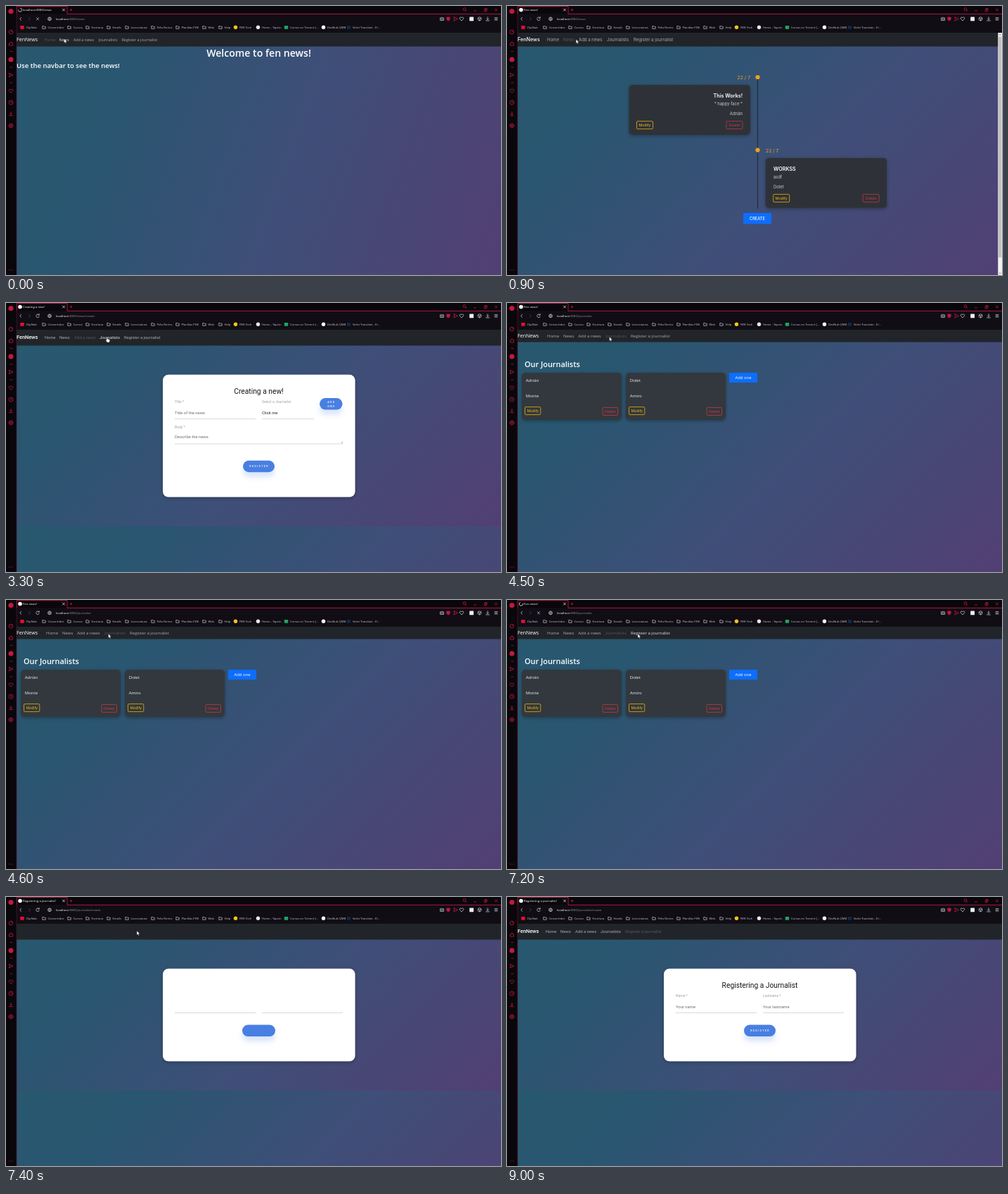
These frames come from a looping animation (704x382 px, 9.5 s). An HTML page:

```html
<!DOCTYPE html>
<html lang="en">
<head>
<meta charset="utf-8">
<title>News site walkthrough</title>
<style>
  html, body { margin: 0; width: 100%; height: 100%; overflow: hidden; background: #09080c; }
  #backdrop { position: absolute; left: 15px; top: 38px; width: 689px; height: 344px; }
  svg { position: absolute; left: 0; top: 0; }
</style>
</head>
<body>
<div id="backdrop"></div>
<svg id="stage" width="704" height="382" viewBox="0 0 704 382"></svg>
<script>
const LOOP = 9500, STEP = 100;
const SEGOE = "'Open Sans', 'Noto Sans', sans-serif";
const INTER = "Inter, sans-serif";
const ROBOTO = "Roboto, sans-serif";
const RED = '#c4183f', AMBER = '#f0a01c', YELLOW = '#ffc107', DANGER = '#dc3545', BLUE = '#0d6efd';

// Drawing helpers: each returns SVG markup.
const text = (x, y, size, str, fill = '#fff', font = SEGOE, extra = '') =>
  `<text x="${x}" y="${y}" font-size="${size}" font-family="${font}" fill="${fill}" ${extra}>${str}</text>`;
const rect = (x, y, w, h, fill, r = 0, extra = '') =>
  `<rect x="${x}" y="${y}" width="${w}" height="${h}" rx="${r}" fill="${fill}" ${extra}/>`;
const circle = (x, y, r, fill, extra = '') => `<circle cx="${x}" cy="${y}" r="${r}" fill="${fill}" ${extra}/>`;
const ring = (x, y, r, color) => circle(x, y, r, 'none', `stroke="${color}" stroke-width=".8"`);
const line = (d, color, width = .8, fill = 'none') =>
  `<path d="${d}" stroke="${color}" stroke-width="${width}" fill="${fill}"/>`;
const icon = (x, y, d, color, fill) => `<g transform="translate(${x} ${y})">${line(d, color, .8, fill)}</g>`;
const MIDDLE = 'text-anchor="middle"', END = 'text-anchor="end"', SEMI = 'font-weight="600"', MEDIUM = 'font-weight="500"';

const HEART = 'M0 2.7L-2.6 0C-3.6-2-1-3.4 0-1.3C1-3.4 3.6-2 2.6 0Z';
const PLANE = 'M-2.8-2.7L3 0L-2.8 2.7L-1.6 0Z';
const DOWNLOAD = 'M0-3V1M-1.7-.6L0 1.2L1.7-.6M-2.8 2.6H2.8';
const CROSS = 'M-1.8-1.8L1.8 1.8M1.8-1.8L-1.8 1.8';
const FOLDER = 'M-2.2-1.8H-.3L.4-1H2.2V1.9H-2.2Z';

const bookmarks = [
  [23, 'ClipNub', '#e3122c'], [54, 'Convertidor'], [90, 'Cursos'], [116, 'Escritura'], [146, 'Emails'],
  [172, 'Licenciatura'], [209, 'Pelis/Series'], [244, 'Planillas FEN'], [282, 'Web'], [305, 'Help'],
  [326.5, 'FEN Tech', '#f5c518', true], [358.5, 'Home - Tapvin', '#e8e8ea', true],
  [398.5, 'Cursos en Torrent [...', '#1fa463'], [451.5, 'DevNub QMB', '#fff', true],
  [487.5, 'Verbi Translate - El...', '#10294a']
];

function bookmarkBar() {
  return bookmarks.map(([x, label, color, round]) => {
    const mark = !color ? icon(x, 30.3, FOLDER, '#b9b9bd')
      : round ? circle(x, 30.3, 2.7, color) : rect(x - 2.7, 27.9, 5.4, 4.8, color, .6);
    return mark + text(x + 5.4, 31.9, 4.15, label, '#c9c9cd');
  }).join('');
}

function sidebar() {
  const dash = y => line(`M5.7 ${y}H9.3`, RED, .7);
  return rect(0, 0, 15, 382, '#09070c') + line('M15 0V382', '#641329', .7) +
    circle(7, 7.5, 3.6, RED) +
    ring(7, 37, 2.8, RED) + line('M7 37L9 35', RED) +
    icon(7, 53.5, 'M-2.5 2.6V-.6H-1L.2-2.8L1 -1H2.6V2.6Z', RED) + dash(64.5) +
    circle(7, 76, 3.5, RED) + dash(87) + icon(7, 98, PLANE, RED) + dash(109) +
    icon(7, 120.5, HEART, RED) + ring(7, 137, 3, RED) + line('M7 135.2V137.2H8.5', RED) +
    icon(7, 153, DOWNLOAD, RED) + ring(7, 170, 2.4, RED) + ring(7, 170, .8, RED) +
    `<circle cx="7" cy="170" r="3" fill="none" stroke="${RED}" stroke-dasharray="1.2 1.16"/>` +
    [4.8, 7, 9.2].map(x => circle(x, 375, .6, RED)).join('');
}

function browser(title, path, loading, t) {
  const gray = '#c4c4c8';
  const favicon = loading
    ? `<path d="M20 3a2.6 2.6 0 1 1-2.6 2.6" stroke="#ddd" stroke-width=".8" fill="none" transform="rotate(${t * .36} 20 5.6)"/>`
    : circle(20, 5.5, 2.8, '#fff');
  const reload = loading ? icon(45, 18.3, CROSS, gray)
    : line('M47 17A2.3 2.3 0 1 0 47.3 18.8M47.2 15.2V17.2H45.2', gray);
  return rect(15, 0, 689, 11, '#09070c') + rect(15, 11, 689, 27, '#100d15') +
    line('M15.4 11V.5H87V11.3H704', RED, .9) +
    favicon + text(24, 7.3, 4.3, title) + icon(82, 5.5, CROSS, '#ddd') +
    icon(92.5, 5.5, 'M-1.8 0H1.8M0-1.8V1.8', RED) +
    icon(652.5, 5, 'M1 1L2.6 2.6M1.4-.4A1.9 1.9 0 1 1-2.4-.4A1.9 1.9 0 1 1 1.4-.4', RED) +
    icon(667, 6.8, 'M-1.8 0H1.8', RED) +
    icon(682, 5.5, 'M-1.8-.8H1V2H-1.8ZM-.8-.8V-1.9H2V1H1', RED) + icon(697, 5.5, CROSS, RED) +
    icon(21, 18.3, 'M1-2.3L-1.3 0L1 2.3', gray) + icon(33, 18.3, 'M-1-2.3L1.3 0L-1 2.3', '#4a484e') + reload +
    ring(62, 18.3, 2.4, gray) + line('M59.6 18.3H64.4M62 15.9Q59.8 18.3 62 20.7Q64.2 18.3 62 15.9', gray, .5) +
    text(71, 20, 4.3, `localhost<tspan fill="#96959b">:8080/${path}</tspan>`) +
    icon(620, 18.4, 'M-2.5-1.5H-1L-.5-2.2H.5L1-1.5H2.5V2H-2.5Z', gray) + ring(620, 18.5, .8, gray) +
    icon(629, 18.3, 'M-2.2-2.2H2.2V.5Q1.8 2 0 2.8Q-1.8 2-2.2.5Z', RED, RED) +
    icon(639.5, 18.3, PLANE, RED) + icon(648, 18.3, HEART, gray) +
    rect(659.2, 15.4, 5.8, 5.8, '#f2f2f4', .5) +
    icon(673.5, 18.3, 'M0-2.7L2.3-1.4V1.4L0 2.7L-2.3 1.4V-1.4ZM-2.3-1.4L0 0L2.3-1.4M0 0V2.7', gray) +
    icon(685, 18.3, DOWNLOAD, gray) + icon(697, 18.3, 'M-2.3-1.7H2.3M-2.3 0H2.3M-2.3 1.7H2.3', gray) +
    bookmarkBar();
}

const labels = ['Home', 'News', 'Add a news', 'Journalists', 'Register a journalist'];

function navbar({ nav, active }, cursor, blank) {
  const { bottom, base, xs, font, size, brand, weight = 400 } = nav;
  const bar = rect(15, 38, 689, bottom - 38, '#212529');
  if (blank) return bar;
  const links = labels.map((label, i) => {
    const hovered = cursor.y < bottom && cursor.x >= xs[i] - 2 && cursor.x < (xs[i + 1] || 240) - 2;
    return text(xs[i], base, size, label, i === active ? '#54585c' : hovered ? '#e2e3e4' : '#a9abad', font);
  });
  return bar + text(15, base + .5, brand, 'FenNews', '#fff', font, `font-weight="${weight}"`) + links.join('');
}

function outlineButton(x, y, w, label, color, font) {
  return rect(x, y, w, 11, 'none', 1.4, `stroke="${color}" stroke-width=".7"`) +
    text(x + w / 2, y + 7.4, 5.1, label, color, font, MIDDLE);
}

function homePage() {
  return text(359.5, 72.4, 14.1, 'Welcome to fen news!', '#fff', SEGOE, `${SEMI} ${MIDDLE}`) +
    text(15, 88.4, 9.55, 'Use the navbar to see the news!', '#fff', SEGOE, SEMI);
}

function newsCard(x, y, textX, anchor, lines) {
  const [title, body, author] = lines;
  return rect(x, y, 172.5, 71, '#2d3338', 5, 'filter="url(#soft)"') +
    text(textX, y + 18, 7.2, title, '#fff', INTER, `${SEMI} ${anchor}`) +
    text(textX, y + 29.3, 5.9, body, '#c9cbcd', INTER, anchor) +
    text(textX, y + 43.3, 5.9, author, '#c9cbcd', INTER, anchor) +
    outlineButton(x + 11, y + 51.6, 23, 'Modify', YELLOW, INTER) +
    outlineButton(x + 138.5, y + 51.6, 23, 'Delete', DANGER, INTER);
}

function newsPage() {
  return line('M356.5 97V288', '#252c36', 1.2) +
    circle(356.5, 101, 3.1, AMBER) + text(346, 103.8, 6.8, '22 / 7', AMBER, INTER, END) +
    newsCard(173.5, 112, 335, END, ['This Works!', '* happy face *', 'Adrián']) +
    circle(356.5, 204.6, 3.1, AMBER) + text(368, 207.6, 6.8, '22 / 7', AMBER, INTER) +
    newsCard(367.7, 215.8, 379, '', ['WORKSS', 'asdf', 'Dolet']) +
    rect(336, 294, 40, 15.6, BLUE, .8) + text(356, 304, 5.7, 'CREATE', '#fff', INTER, `${MIDDLE} ${MEDIUM}`) +
    rect(698.3, 38, 5.7, 344, '#f1f1f1') + rect(699, 43.5, 4.4, 313.5, '#c1c1c1') +
    line('M699.8 41.5L701.2 39.9L702.6 41.5M699.8 378.6L701.2 380.2L702.6 378.6', '#555', .7);
}

function pill(x, y, w, rows) {
  const first = y + 9.7 - (rows.length - 1) * 3;
  return rect(x, y, w, 16.6, '#4a7fe2', 8.3, 'filter="url(#glow)"') +
    rows.map((row, i) => text(x + w / 2 + .6, first + i * 6, 3.7, row, '#fff', ROBOTO,
      `${MIDDLE} ${MEDIUM} letter-spacing="1.35"`)).join('');
}
const formCard = height => rect(223, 101.8, 273.5, height, '#fff', 8, 'filter="url(#soft)"');
const formTitle = str => text(359.5, 129, 10.27, str, '#161616', ROBOTO, MIDDLE);
const underline = (x, y, w) => line(`M${x} ${y}h${w}`, '#c9c9c9', .7);
const field = (x, y, label, value, color = '#6c6c6c') =>
  text(x, y, 5, label, '#a0a0a0', ROBOTO) + text(x, y + 16, 5.87, value, color, ROBOTO);

function createPage(blank) {
  return formCard(173.7) + underline(240, 164.5, 115) + underline(364, 164.5, 74) + underline(240, 200, 239) +
    line('M476.5 199L479 196.5M478 199L479 198', '#777', .5) +
    pill(446, 135, 32.5, blank ? [] : ['ADD', 'ONE']) + pill(337, 223.7, 45, blank ? [] : ['REGISTER']) +
    (blank ? '' : formTitle('Creating a new!') + field(240, 142, 'Title *', 'Title of the news') +
      field(364, 142, 'Select a Journalist', 'Click me', '#262626') +
      field(240, 177.6, 'Body *', '').replace('</text>', '</text>') + text(240, 192, 5.87, 'Describe the news', '#6c6c6c', ROBOTO));
}

function registerPage(blank) {
  return formCard(131.5) + underline(240, 164.5, 115) + underline(364, 164.5, 115) +
    (blank ? pill(336, 181.5, 47, []) : pill(337, 181.5, 45, ['REGISTER']) +
      formTitle('Registering a Journalist') +
      field(240, 142, 'Name *', 'Your name') + field(364, 142, 'Lastname *', 'Your lastname'));
}

function journalistsPage() {
  const card = (x, first, last) => rect(x, 99, 142, 67, '#32383d', 5, 'filter="url(#soft)"') +
    text(x + 5.7, 112.3, 6.1, first, '#f2f2f2', SEGOE, MEDIUM) +
    text(x + 5.7, 133.6, 6.1, last, '#f2f2f2', SEGOE, MEDIUM) +
    outlineButton(x + 4.5, 147.6, 22.3, 'Modify', YELLOW, SEGOE) +
    outlineButton(x + 115, 148.4, 21.5, 'Delete', DANGER, SEGOE);
  return text(25, 90.6, 10.9, 'Our Journalists', '#fff', SEGOE, SEMI) +
    card(21, 'Adrián', 'Monte') + card(169, 'Dolet', 'Amiro') +
    rect(316, 99, 40, 14, BLUE, .6) + text(336, 108, 5.9, 'Add one', '#fff', SEGOE, MIDDLE);
}

const formNav = { bottom: 60.5, base: 50.8, xs: [54.7, 76, 97, 133, 168], font: ROBOTO, size: 5.87, brand: 7.33, weight: 500 };
const pages = {
  home: { draw: homePage, active: 0, angle: 110, tile: 344,
    nav: { bottom: 57.5, base: 49.7, xs: [54.5, 75.5, 95.7, 131.7, 164.4], font: SEGOE, size: 5.5, brand: 7.1 } },
  news: { draw: newsPage, active: 1, angle: 135, tile: 365,
    nav: { bottom: 57.5, base: 49.5, xs: [57, 80, 102, 142, 180], font: INTER, size: 6.05, brand: 7.2, weight: 500 } },
  create: { draw: createPage, active: 2, angle: 135, tile: 279, nav: formNav },
  journalists: { draw: journalistsPage, active: 3, angle: 135, tile: 344,
    nav: { bottom: 55.5, base: 48.8, xs: [57, 80, 101.3, 140.3, 176], font: SEGOE, size: 6.05, brand: 7.1 } },
  register: { draw: registerPage, active: 4, angle: 135, tile: 237, nav: formNav }
};

// Start time, page, tab title, path, loading, fonts still missing.
const scenes = [
  [0, 'home', 'localhost:8080/news', 'news', true],
  [100, 'news', 'Fen news!', 'news'],
  [2500, 'news', 'Fen news!', 'news', true],
  [2600, 'create', 'Creating a new!', 'news/create', false, true],
  [2700, 'create', 'Creating a new!', 'news/create'],
  [4400, 'create', 'Creating a new!', 'journalist', true],
  [4500, 'journalists', 'Fen news!', 'journalist'],
  [7200, 'journalists', 'Fen news!', 'journalist', true],
  [7300, 'register', 'Registering a journalist!', 'journalist/create', false, true],
  [7500, 'register', 'Registering a journalist!', 'journalist/create']
];

// Time, pointer tip x and y.
const pointerPath = [
  [0, 82.5, 46.5], [600, 82.5, 46.5], [1200, 113.7, 48], [2700, 113.7, 48], [3300, 142, 48],
  [3500, 142, 48], [3600, 142.5, 48], [3700, 142.5, 48], [3800, 143.5, 48], [4400, 143.5, 48], [4500, 145.5, 48],
  [5400, 145.5, 48], [6400, 184, 48], [6900, 184, 48], [7000, 186, 48], [7800, 186, 48], [8400, 359, 189], [LOOP, 359, 189]
];

function pointerAt(t) {
  const i = pointerPath.findIndex(([time]) => time > t);
  const [t0, x0, y0] = pointerPath[i - 1], [t1, x1, y1] = pointerPath[i];
  const k = (t - t0) / (t1 - t0), ease = k * k * (3 - 2 * k);
  return { x: x0 + (x1 - x0) * ease, y: y0 + (y1 - y0) * ease };
}

function pointer({ x, y }, t) {
  if (t >= 9000) return '';
  const hand = (t >= 1200 && t < 2500) || (t >= 3200 && t < 4400) || (t >= 6300 && t < 7200) || t >= 8400;
  const shape = hand
    ? 'M1 .5Q1.9-.3 2.4.7V3L5.2 3.7Q6 4 5.8 5L5 8H2L-.2 5.3Q-.2 4.2 1 4.8Z'
    : 'M0 0V5.9L1.4 4.7L2.4 6.8L3.4 6.3L2.5 4.3H4.3Z';
  return `<g transform="translate(${x} ${y})">${line(shape, '#111', .4, '#fff')}</g>`;
}

const defs = `<defs>
  <filter id="soft" x="-20%" y="-20%" width="140%" height="150%"><feDropShadow dx="0" dy="1.5" stdDeviation="2.5" flood-opacity=".3"/></filter>
  <filter id="glow" x="-40%" y="-40%" width="180%" height="260%"><feDropShadow dx="0" dy="7" stdDeviation="3.5" flood-color="#4a7fe2" flood-opacity=".2"/></filter>
</defs>`;
const stage = document.getElementById('stage');
const backdrop = document.getElementById('backdrop');
let shown = -1;

function frame(now) {
  const t = Math.floor(now % LOOP / STEP) * STEP;
  if (t !== shown) {
    shown = t;
    const [, name, title, path, loading, blank] = scenes.filter(([start]) => start <= t).pop();
    const page = pages[name], cursor = pointerAt(t);
    backdrop.style.background =
      `linear-gradient(${page.angle}deg, #28596f, #295670 20%, #3e4f78 55%, #523f73) 0 0 / 100% ${page.tile}px`;
    stage.innerHTML = defs + browser(title, path, loading, t) + sidebar() +
      navbar(page, cursor, blank) + page.draw(blank) + pointer(cursor, t);
  }
  requestAnimationFrame(frame);
}
frame(performance.now());
</script>
</body>
</html>
```
